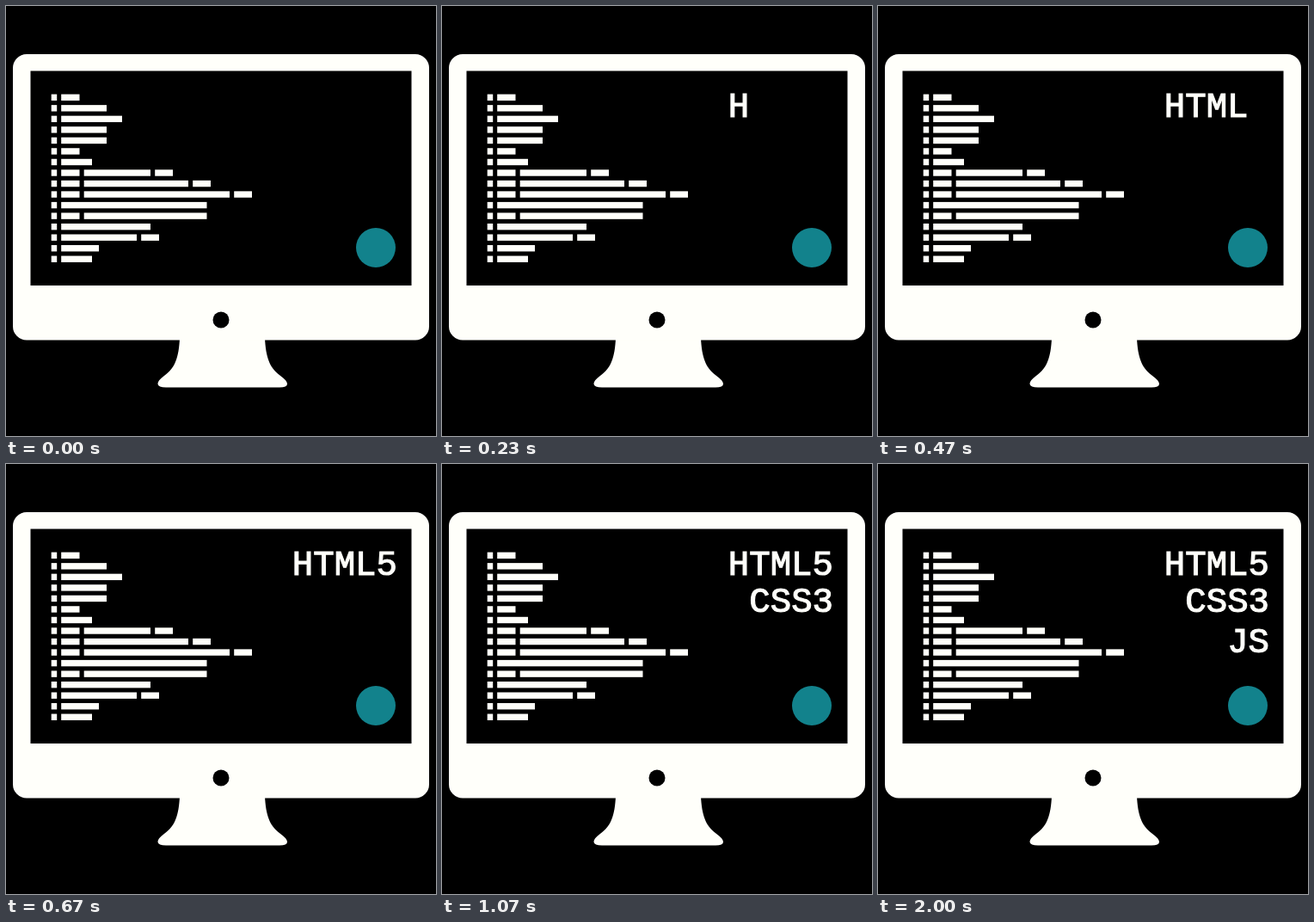
Write an HTML page that moves like this. It is 500 px wide and 500 px high and loops after 3.71 s.

```html
<!DOCTYPE html>
<html lang="en">
<head>
<meta charset="utf-8">
<title>Code monitor</title>
<style>
html, body { margin: 0; width: 100%; height: 100%; overflow: hidden; background: #000; }
svg { display: block; width: 100vw; height: 100vh; fill: #fffffa; }
text { font: 40.7px "Liberation Mono", monospace; stroke: #fffffa; stroke-width: 1.2px; }
</style>
</head>
<body>
<svg viewBox="0 0 500 500">
  <path d="M202 386C201 409 196 420 187 427.500C180 433 176.500 436 176.500 439.500Q177 443.500 186 443.500H318Q327 443.500 327 439.500C327 436 323 433 316 427.500C307 420 302 409 301 386Z"/>
  <rect x="8" y="56" width="484" height="332.500" rx="16"/>
  <path fill="#000" d="M28.500 75.500H471.500V325H28.500Z"/>
  <circle cx="250" cy="365" r="9.500" fill="#000"/>
  <g id="code"></g>
  <circle cx="430" cy="281" r="23" fill="#12828c"/>
  <g id="words"></g>
</svg>
<script>
const LOOP = 3710;
const NS = "http://www.w3.org/2000/svg";

function add(parent, tag, attrs) {
  const el = document.createElementNS(NS, tag);
  for (const key in attrs) el.setAttribute(key, attrs[key]);
  return document.getElementById(parent).appendChild(el);
}

// Right edges of the bars in each row; bars are separated by a fixed gap.
const rows = [
  [85.5], [117], [135], [117], [117], [85.5], [100],
  [85.5, 168, 194], [85.5, 212, 238], [85.5, 260, 286],
  [233.5], [85.5, 233.5], [168], [152, 178], [108], [100]
];
rows.forEach((ends, i) => {
  const y = 102.6 + i * 12.53;
  const bar = (x, end) => add("code", "rect", { x, y, width: end - x, height: 7.4 });
  bar(52.7, 59.2);
  let x = 64.2;
  for (const end of ends) {
    bar(x, end);
    x = end + 5.2;
  }
});

// Each line starts typing at its own time, one letter per 100 ms.
const lines = [
  { word: "HTML5", x: 332.8, y: 129.3, start: 170 },
  { word: "CSS3", x: 357.3, y: 172.3, start: 770 },
  { word: "JS", x: 406.2, y: 218.5, start: 1230 }
];
for (const line of lines) line.el = add("words", "text", { x: line.x, y: line.y });

function draw(now) {
  const t = now % LOOP;
  for (const { el, word, start } of lines) {
    const count = Math.max(0, Math.floor((t - start) / 100) + 1);
    const shown = word.slice(0, count);
    if (el.textContent !== shown) el.textContent = shown;
  }
}

let origin;
function tick(now) {
  origin ??= now;
  draw(now - origin);
  requestAnimationFrame(tick);
}
draw(0);
requestAnimationFrame(tick);
</script>
</body>
</html>
```
